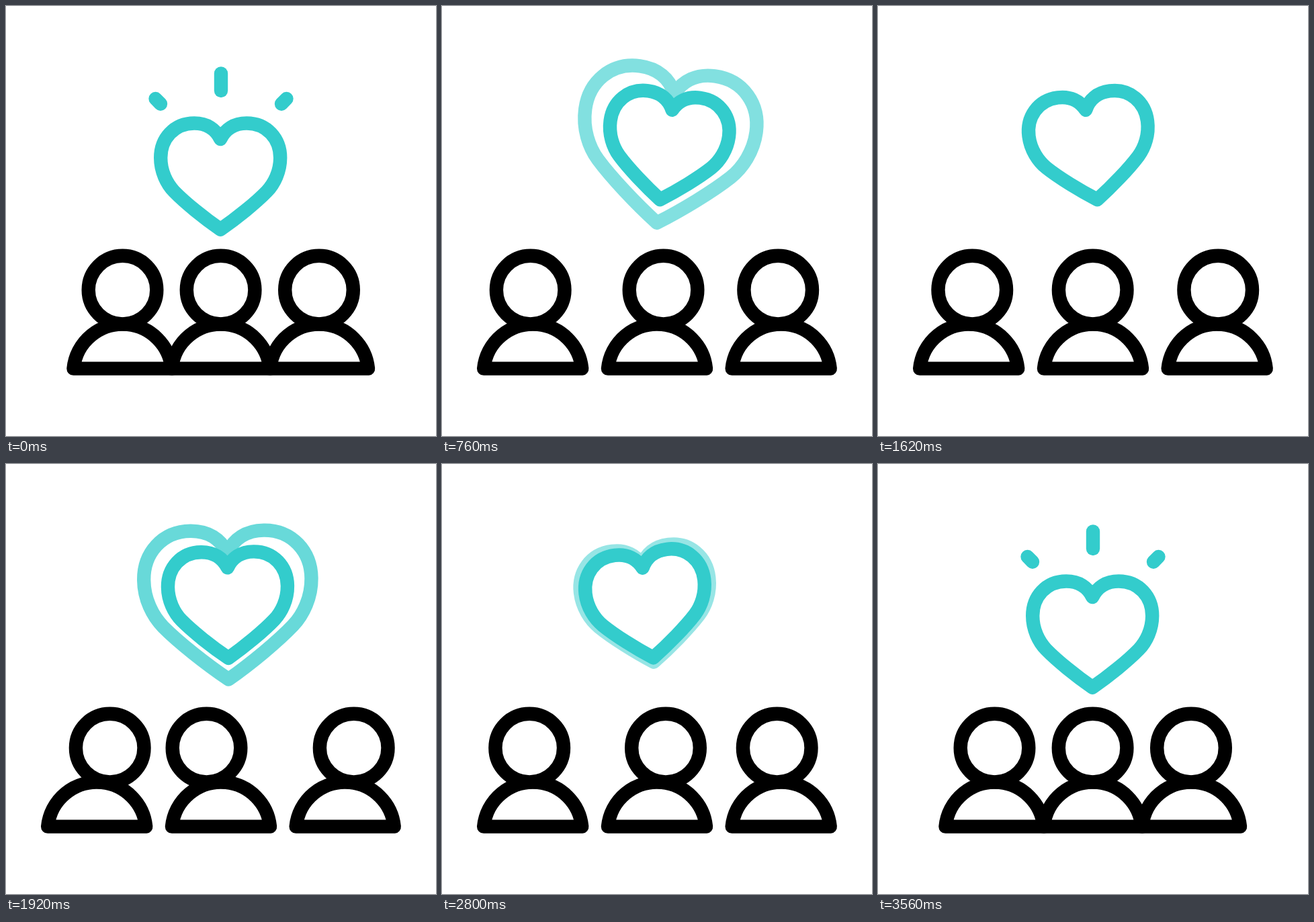
Recreate the animation shown at these times as an HTML page with a canvas. Size 640 by 640 pixels, loop 3600 ms.

```html
<!DOCTYPE html>
<html lang="en">
<head>
<meta charset="utf-8">
<title>People and heart</title>
<style>
html, body { margin: 0; overflow: hidden; background: #fff; }
canvas { display: block; }
</style>
</head>
<body>
<canvas id="stage" width="640" height="640"></canvas>
<script>
const ctx = document.getElementById('stage').getContext('2d');
const LOOP = 3600, TEAL = '#33cccc';
const heart = new Path2D(
  'M0-55.5C-7-70-20-79-39-79C-69-79-89-56-89-27.5C-89-7-80 11-69 22.5' +
  'C-53 39-24 62.500 0 79C24 62.500 53 39 69 22.500' +
  'C80 11 89-7 89-27.500C89-56 69-79 39-79C20-79 7-70 0-55.500Z');

const clamp = v => Math.max(0, Math.min(1, v));
const ramp = (t, from, to) => clamp((t - from) / (to - from));
const smooth = p => p * p * (3 - 2 * p);

// Monotone cubic through [time, value] keys; flat at the ends and at extremes.
function track(times, values) {
  const slope = i => (values[i + 1] - values[i]) / (times[i + 1] - times[i]);
  const tangent = times.map((_, i) => {
    if (i === 0 || i === times.length - 1) return 0;
    const a = slope(i - 1), b = slope(i);
    return a * b <= 0 ? 0 : 2 * a * b / (a + b);
  });
  return t => {
    if (t <= times[0]) return values[0];
    const i = times.findIndex(k => k > t) - 1;
    if (i < 0) return values[values.length - 1];
    const h = times[i + 1] - times[i], p = (t - times[i]) / h, e = smooth(p);
    return values[i] * (1 - e) + values[i + 1] * e
      + h * p * (1 - p) * (tangent[i] * (1 - p) - tangent[i + 1] * p);
  };
}

const leanTimes = [400, 760, 1280, 1920, 2300, 2800, 3420];
const lean = values => track(leanTimes, values);
const people = [
  { near: 173.5, far: 135.2, lean: lean([0, -3.5, -12.5, 19.5, 13, -5, 0]) },
  { near: 319.6, far: 320, lean: lean([0, 9.5, 25.5, -21.5, -12, 13, 0]) },
  { near: 466, far: 504.7, lean: lean([0, -4.5, -12.5, 13, 7.5, -6, 0]) }
];

const heartX = track([205, 740, 1280, 1360, 1920, 2080, 2300, 2780, 3120],
                     [0, 16, -9, -12, 11, 13, 9, -14.2, 0]);
const heartTilt = track([205, 800, 1280, 1580, 1920, 2270, 2790, 3060],
                        [0, 7.8, 0, -7.5, -0.6, 8.9, -6.8, 0]);
const echoes = [[516, 360], [1699, 360], [2738, 500]];

// Each ray runs from its inner end to its outer end.
const rayGroups = [
  { grow: [3420, 3560], fade: [3810, 4000], rays: [
    [230, 145.7, 222.5, 138], [320, 126, 320, 100.5], [410, 145.7, 417.5, 138]] },
  { grow: [1120, 1285], fade: [1300, 1480], rays: [
    [565, 349.5, 573.8, 335.8], [583.7, 389.2, 600.3, 388.3]] },
  { grow: [2140, 2320], fade: [2370, 2540], rays: [
    [95.7, 334.3, 88.8, 323.4], [68.6, 373, 55.3, 372]] }
];

function drawRays(t) {
  for (const { grow, fade, rays } of rayGroups) {
    const time = fade[1] > LOOP && t < LOOP / 2 ? t + LOOP : t;
    const head = smooth(ramp(time, ...grow)), tail = smooth(ramp(time, ...fade));
    if (head <= tail) continue;
    for (const [x1, y1, x2, y2] of rays) {
      const dx = x2 - x1, dy = y2 - y1;
      ctx.beginPath();
      ctx.moveTo(x1 + dx * tail, y1 + dy * tail);
      ctx.lineTo(x1 + dx * head, y1 + dy * head);
      ctx.stroke();
    }
  }
}

function drawHeart(t) {
  const lift = smooth(ramp(t, 205, 660)) - smooth(ramp(t, 2820, 3300));
  const pose = new DOMMatrix()
    .translate(319.2 + heartX(t), 253.5 - 43.7 * lift)
    .rotate(heartTilt(t));
  const outline = scale => {
    const path = new Path2D();
    path.addPath(heart, pose.scale(scale));
    ctx.stroke(path);
  };
  for (const [start, length] of echoes) {
    const p = (t - start) / length;
    if (p <= 0 || p >= 1) continue;
    ctx.globalAlpha = Math.min(1, p * 4, (1 - p) * 1.92);
    outline(1 + 0.65 * p);
  }
  ctx.globalAlpha = 1;
  outline(1);
}

function drawPeople(t) {
  const spread = smooth(ramp(t, 205, 730)) - smooth(ramp(t, 2890, 3430));
  for (const { near, far, lean } of people) {
    const x = near + (far - near) * spread;
    ctx.beginPath();
    ctx.arc(x + lean(t), 422.6, 50.8, 0, 2 * Math.PI);
    ctx.stroke();
    ctx.beginPath();
    ctx.arc(x, 547, 73.4, Math.PI + 0.1, -0.1);
    ctx.closePath();
    ctx.stroke();
  }
}

function draw(now) {
  const t = now % LOOP;
  ctx.fillStyle = '#fff';
  ctx.fillRect(0, 0, 640, 640);
  ctx.lineWidth = 20.4;
  ctx.lineCap = ctx.lineJoin = 'round';
  ctx.strokeStyle = TEAL;
  drawRays(t);
  drawHeart(t);
  ctx.strokeStyle = '#000';
  drawPeople(t);
}

const start = performance.now();
function frame() {
  draw(performance.now() - start);
  requestAnimationFrame(frame);
}
frame();
</script>
</body>
</html>
```
